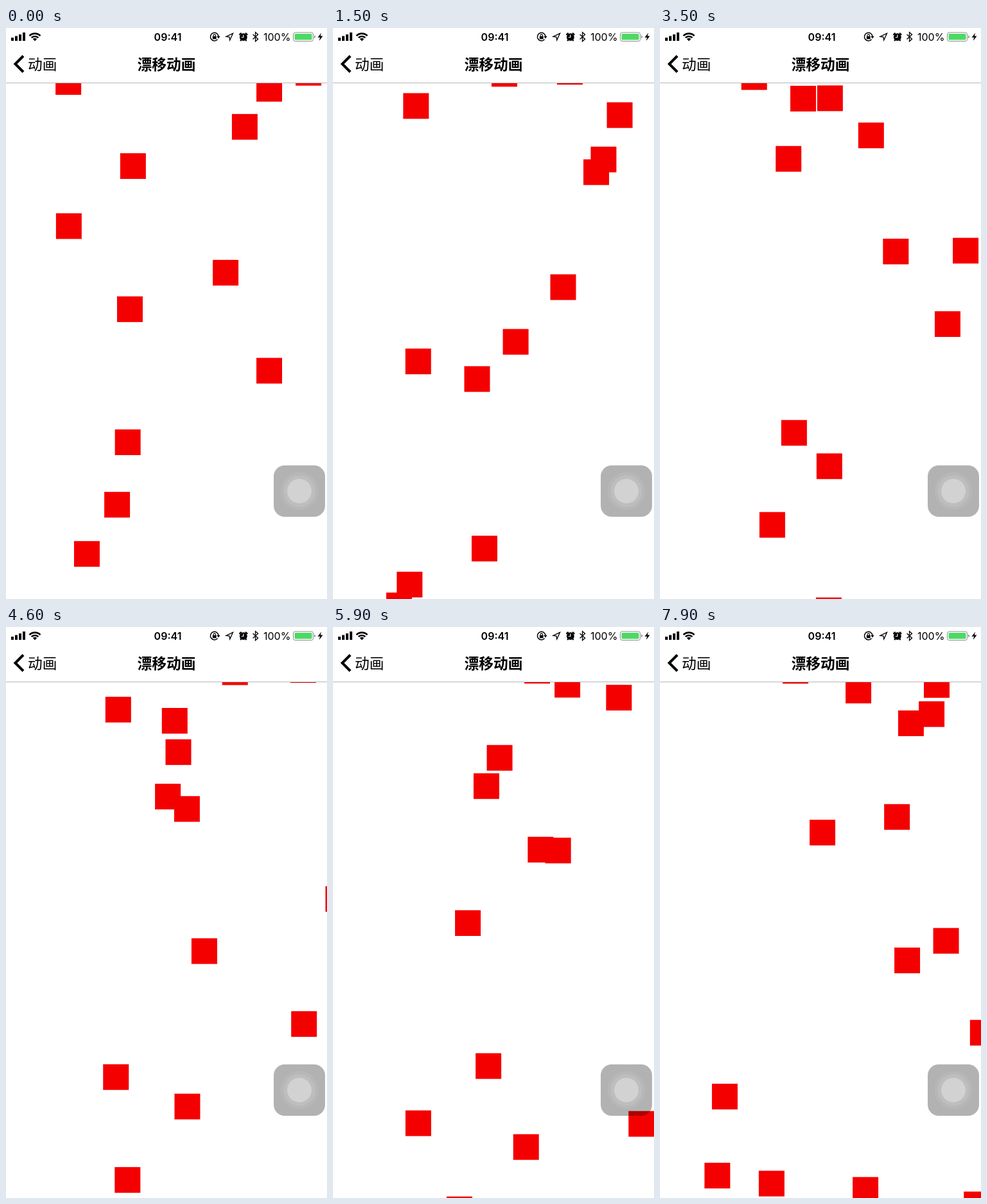
An HTML page for the animation above (8 s loop, 500 px wide and 889 px high).

```html
<!DOCTYPE html>
<html lang="zh-Hans">
<head>
<meta charset="utf-8">
<title>漂移动画</title>
<style>
html, body { margin: 0; width: 100%; height: 100%; overflow: hidden; background: #fff; }
svg { display: block; width: 500px; height: 889px; }
.cjk { font: 22.67px "Noto Sans CJK SC", "Noto Sans CJK", sans-serif; }
.bar { font: 16px Inter, Roboto, sans-serif; }
.line { fill: none; stroke: #000; }
</style>
</head>
<body>
<svg viewBox="0 0 500 889">
  <g id="squares" fill="#f40000"></g>

  <rect width="500" height="85" fill="#fff"/>
  <rect y="85" width="500" height="1" fill="#b8b8b8"/>
  <path class="line" stroke-width="4" d="M27 43.5L14.5 56L27 68.500"/>
  <text class="cjk" x="34" y="64.500">动画</text>
  <text class="cjk" x="250" y="64.500" text-anchor="middle" font-weight="600" style="font-weight:600">漂移动画</text>

  <!-- signal and wifi -->
  <path d="M8 15h4v5h-4zM14 12.500h4v7.500h-4zM20 10h4v10h-4zM26 7h4v13h-4z"/>
  <g class="line" stroke-width="2.600">
    <path d="M36.500 12.200a11.800 11.800 0 0 1 17 0"/>
    <path d="M39.700 15.200a7.400 7.400 0 0 1 10.600 0"/>
  </g>
  <path d="M45 20.500l-3.200-3.400a4.600 4.600 0 0 1 6.400 0z"/>
  <text class="bar" x="252" y="19.500" text-anchor="middle" style="font-weight:600">09:41</text>

  <!-- rotation lock -->
  <path class="line" stroke-width="1.500" d="M329.500 17.800a6.300 6.300 0 1 1 1.500-4.800"/>
  <path d="M328.200 12.800h5.400l-2.700 3.700z"/>
  <rect x="321.800" y="12.800" width="5.800" height="4.500"/>
  <path class="line" stroke-width="1.100" d="M323 13v-1.400a1.700 1.700 0 0 1 3.400 0v1.400"/>
  <!-- location -->
  <path class="line" stroke-width="1.300" d="M353.500 8.300L343 13.400L348 14L348.700 19z"/>
  <!-- alarm -->
  <circle cx="369.800" cy="14.200" r="5.900"/>
  <path class="line" stroke-width="2.200" d="M363.400 10.800l3.200-3M376.200 10.800l-3.200-3M366.300 18.500l-1.200 1.600M373.300 18.500l1.200 1.600"/>
  <path fill="none" stroke="#fff" stroke-width="1.200" d="M369.800 10.500v4h-3"/>
  <!-- bluetooth -->
  <path class="line" stroke-width="1.300" d="M384.500 10l8 7.300l-4 3.500v-14l4 3.500l-8 7.300"/>

  <text class="bar" x="401" y="19.500">100%</text>
  <rect x="447.500" y="7" width="31" height="13.600" rx="3" fill="none" stroke="#8a8a8a"/>
  <rect x="449.500" y="9" width="27" height="9.600" rx="1.500" fill="#4cd964"/>
  <path fill="#8a8a8a" d="M480 11.500q2 .500 2 2.300t-2 2.300z"/>
  <path d="M491.200 7.500l-5.700 7.200h3.600l-1.300 5.300l5.700-7.400h-3.700z"/>

  <!-- floating button -->
  <rect x="417" y="681" width="80" height="80" rx="17" fill="#000" fill-opacity=".3"/>
  <g fill="#fff" transform="translate(457 721)">
    <circle r="29.500" fill-opacity=".07"/>
    <circle r="24.500" fill-opacity=".1"/>
    <circle r="19" fill-opacity=".3"/>
  </g>
</svg>
<script>
const LOOP = 8000, STEP = 100, TICK = 800;
const TOP = 45.3, FALL = 843.7;
const FAST = 10000, SLOW = 20000;
const FIRST = -16 * TICK, START = -4.35 * TICK;

// One square leaves per tick: start x, end x, duration
const drops = [
  [65, 309.5, SLOW], [490.7, 40, SLOW], [323, 80, FAST], [445.7, 81, FAST],
  [7.5, 243.5, FAST], [57, 657, FAST], [304, 760, SLOW], [37.6, 177.3, FAST],
  [50.4, 769, FAST], [61, 787.6, SLOW], [387, 474.3, FAST], [452.8, 138, FAST],
  [247.3, 200, SLOW], [350, 9, FAST], [179, 631.6, FAST], [120.7, 575, FAST],
  [334.5, 697.6, SLOW], [443.7, 97.5, FAST], [298.8, 54, SLOW], [415, 272, FAST],
  [411, 411, FAST], [191, 191, FAST]
];

const layer = document.getElementById("squares");
const nodes = drops.map(() => {
  const node = document.createElementNS("http://www.w3.org/2000/svg", "rect");
  node.setAttribute("width", 40);
  node.setAttribute("height", 40);
  return layer.appendChild(node);
});

// cubic-bezier(.42, 0, .58, 1), solved by bisection
function easeInOut(p) {
  let lo = 0, hi = 1, s;
  for (let i = 0; i < 24; i++) {
    s = (lo + hi) / 2;
    if (s * (1.26 + s * (0.52 * s - 0.78)) < p) lo = s;
    else hi = s;
  }
  return s * s * (3 - 2 * s);
}

function draw(time) {
  const now = START + Math.floor(time % LOOP / STEP) * STEP;
  drops.forEach(([from, to, duration], i) => {
    const p = (now - FIRST - i * TICK) / duration;
    const node = nodes[i];
    const live = p > 0 && p < 1;
    node.style.display = live ? "" : "none";
    if (!live) return;
    const e = easeInOut(p);
    node.setAttribute("x", from + (to - from) * e);
    node.setAttribute("y", TOP + FALL * e);
  });
}

const began = performance.now();
function loop() {
  draw(performance.now() - began);
  requestAnimationFrame(loop);
}
loop();
</script>
</body>
</html>
```
